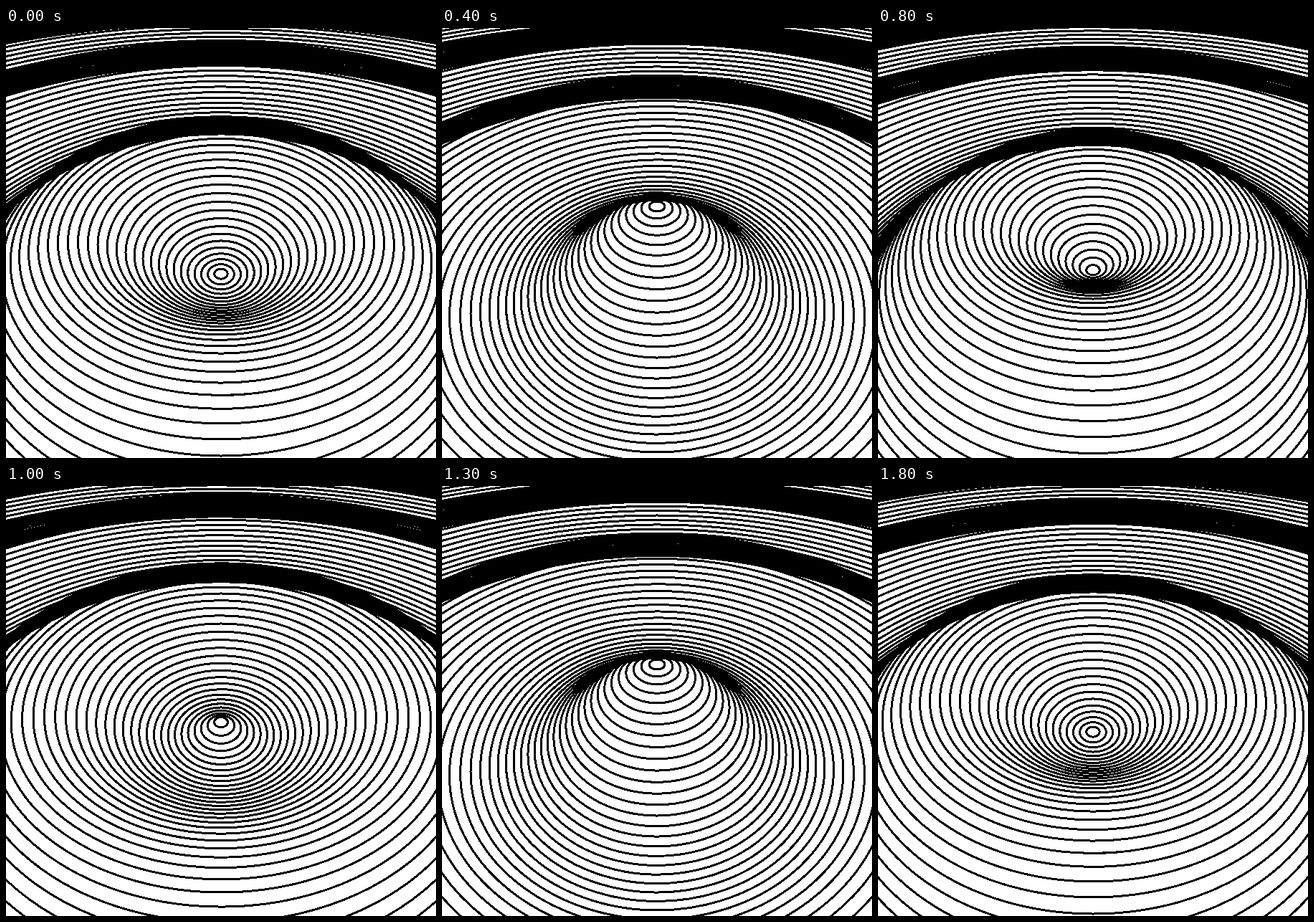
Write an HTML page without scripts that moves like this. It is 600 px wide and 600 px high and loops after 1900 ms.

```html
<!DOCTYPE html>
<html lang="en">
<head>
<meta charset="utf-8">
<title>Ripple rings</title>
<style>
@property --step { syntax: "<number>"; inherits: true; initial-value: 0; }
@property --n { syntax: "<number>"; inherits: false; initial-value: 1; }
@property --r { syntax: "<number>"; inherits: false; initial-value: 0; }
@property --lift { syntax: "<number>"; inherits: false; initial-value: 0; }
@property --depth { syntax: "<number>"; inherits: false; initial-value: 1; }
@property --near { syntax: "<number>"; inherits: false; initial-value: 1; }
@property --top { syntax: "<number>"; inherits: false; initial-value: 0; }
@property --shape { syntax: "<number>"; inherits: false; initial-value: 1; }
@property --ratio { syntax: "<number>"; inherits: false; initial-value: 1; }
@property --bend { syntax: "<number>"; inherits: false; initial-value: 1; }

html, body { margin: 0; width: 100%; height: 100%; overflow: hidden; background: #fff; }

svg {
  display: block;
  width: 600px;
  height: 600px;
  overflow: hidden;
  --eye: 519.615;
  animation: ripple 1.9s steps(19) infinite;
}
@keyframes ripple { from { --step: 0; } to { --step: 19; } }

/* Circles on a plane tilted 45 degrees, seen in perspective.
   r: radius times cos 45; lift: height of the slowly fading wave times cos 45. */
ellipse {
  --n: calc(var(--tens) * 10 + var(--unit));
  --r: calc(var(--n) * 7.07107);
  --lift: calc((47.5 - 0.075 * var(--n)) * cos(0.15 * var(--n) + 2.84 - var(--step) * 2 * pi / 9));
  --depth: calc(var(--eye) - var(--lift));
  --near: calc(var(--eye) - 2 * var(--lift));
  --top: calc(300 - var(--eye) * (var(--r) + var(--lift)) / (var(--depth) + var(--r)));
  /* Squared axis ratio; rings reaching behind the eye become very large ellipses. */
  --shape: calc(2 * (var(--depth) * var(--depth) - var(--r) * var(--r)) / (var(--near) * var(--near)));
  --ratio: max(0.2, var(--shape));
  --bend: calc(2 * var(--r) * var(--eye) / var(--near) + 14 * (var(--ratio) - var(--shape)));
  cx: 300px;
  cy: calc(1px * (var(--top) + var(--bend) / var(--ratio)));
  rx: calc(1px * var(--bend) / sqrt(var(--ratio)));
  ry: calc(1px * var(--bend) / var(--ratio));
  fill: none;
  stroke: #000;
  stroke-width: 3px;
  shape-rendering: crispEdges;
}
ellipse:nth-child(1) { --unit: 1; }
ellipse:nth-child(2) { --unit: 2; }
ellipse:nth-child(3) { --unit: 3; }
ellipse:nth-child(4) { --unit: 4; }
ellipse:nth-child(5) { --unit: 5; }
ellipse:nth-child(6) { --unit: 6; }
ellipse:nth-child(7) { --unit: 7; }
ellipse:nth-child(8) { --unit: 8; }
ellipse:nth-child(9) { --unit: 9; }
ellipse:nth-child(10) { --unit: 10; }
</style>
</head>
<body>
<svg viewBox="0 0 600 600">
<g style="--tens:0"><ellipse/><ellipse/><ellipse/><ellipse/><ellipse/><ellipse/><ellipse/><ellipse/><ellipse/><ellipse/></g>
<g style="--tens:1"><ellipse/><ellipse/><ellipse/><ellipse/><ellipse/><ellipse/><ellipse/><ellipse/><ellipse/><ellipse/></g>
<g style="--tens:2"><ellipse/><ellipse/><ellipse/><ellipse/><ellipse/><ellipse/><ellipse/><ellipse/><ellipse/><ellipse/></g>
<g style="--tens:3"><ellipse/><ellipse/><ellipse/><ellipse/><ellipse/><ellipse/><ellipse/><ellipse/><ellipse/><ellipse/></g>
<g style="--tens:4"><ellipse/><ellipse/><ellipse/><ellipse/><ellipse/><ellipse/><ellipse/><ellipse/><ellipse/><ellipse/></g>
<g style="--tens:5"><ellipse/><ellipse/><ellipse/><ellipse/><ellipse/><ellipse/><ellipse/><ellipse/><ellipse/><ellipse/></g>
<g style="--tens:6"><ellipse/><ellipse/><ellipse/><ellipse/><ellipse/><ellipse/><ellipse/><ellipse/><ellipse/><ellipse/></g>
<g style="--tens:7"><ellipse/><ellipse/><ellipse/><ellipse/><ellipse/><ellipse/><ellipse/><ellipse/><ellipse/><ellipse/></g>
<g style="--tens:8"><ellipse/><ellipse/><ellipse/><ellipse/><ellipse/><ellipse/><ellipse/><ellipse/><ellipse/><ellipse/></g>
<g style="--tens:9"><ellipse/><ellipse/><ellipse/><ellipse/><ellipse/><ellipse/><ellipse/><ellipse/><ellipse/><ellipse/></g>
<g style="--tens:10"><ellipse/><ellipse/><ellipse/><ellipse/><ellipse/><ellipse/><ellipse/><ellipse/><ellipse/><ellipse/></g>
<g style="--tens:11"><ellipse/><ellipse/><ellipse/><ellipse/><ellipse/><ellipse/><ellipse/><ellipse/><ellipse/><ellipse/></g>
<g style="--tens:12"><ellipse/><ellipse/><ellipse/><ellipse/><ellipse/><ellipse/><ellipse/><ellipse/><ellipse/><ellipse/></g>
<g style="--tens:13"><ellipse/><ellipse/><ellipse/><ellipse/><ellipse/><ellipse/><ellipse/><ellipse/><ellipse/><ellipse/></g>
<g style="--tens:14"><ellipse/><ellipse/><ellipse/><ellipse/><ellipse/><ellipse/><ellipse/><ellipse/><ellipse/><ellipse/></g>
</svg>
</body>
</html>
```
